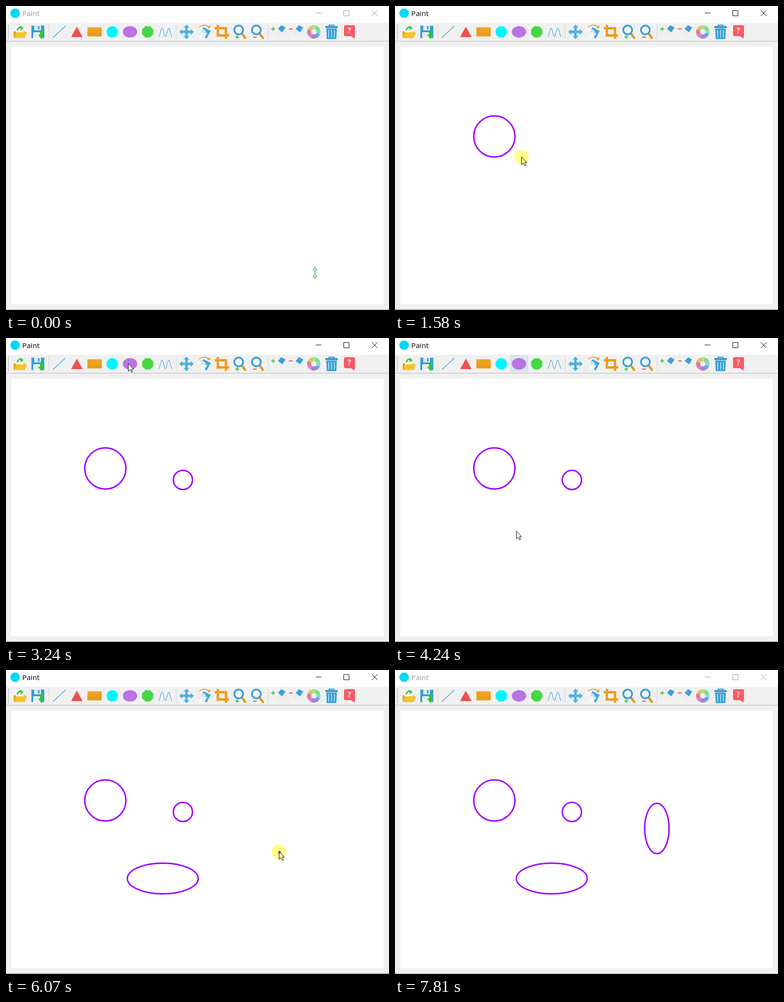
Write an HTML page with a canvas that moves like this. It is 800x635 px and loops after 7880 ms.

```html
<!DOCTYPE html>
<html lang="en">
<head>
<meta charset="utf-8">
<title>Paint</title>
<style>
html, body { margin: 0; width: 100%; height: 100%; overflow: hidden; background: #f0f0f0; }
canvas { display: block; }
</style>
</head>
<body>
<canvas id="stage" width="800" height="635"></canvas>
<script>
const ctx = document.getElementById('stage').getContext('2d');
const LOOP = 7880, STEP = 78, FOCUS = 710, BLUR = 7810, HIDE = 7248;
const BLUE = '#3ca7df', ORANGE = '#ee9f20', GREEN = '#35c935', RED = '#ef5350', PURPLE = '#a000ff';

// Drawing helpers
function fill(color) {
  ctx.fillStyle = color;
  ctx.fill();
}
function stroke(color, width) {
  ctx.strokeStyle = color;
  ctx.lineWidth = width;
  ctx.stroke();
}
function trace(points) {
  ctx.beginPath();
  for (let i = 0; i < points.length; i += 2) ctx.lineTo(points[i], points[i + 1]);
}
function poly(color, ...points) {
  trace(points);
  ctx.closePath();
  fill(color);
}
function line(color, width, ...points) {
  trace(points);
  stroke(color, width);
}
function rect(color, x, y, w, h) {
  ctx.fillStyle = color;
  ctx.fillRect(x, y, w, h);
}
function oval(color, x, y, rx, ry = rx) {
  ctx.beginPath();
  ctx.ellipse(x, y, rx, ry, 0, 0, 2 * Math.PI);
  fill(color);
}
function ring(color, width, x, y, rx, ry = rx) {
  ctx.beginPath();
  ctx.ellipse(x, y, rx, ry, 0, 0, 2 * Math.PI);
  stroke(color, width);
}
function arc(color, width, x, y, r, from, to) {
  ctx.beginPath();
  ctx.arc(x, y, r, from, to);
  stroke(color, width);
}
function turned(angle, draw) {
  ctx.save();
  ctx.rotate(angle);
  draw();
  ctx.restore();
}
function text(str, x, y, font, color) {
  ctx.font = font;
  ctx.fillStyle = color;
  ctx.fillText(str, x, y);
}
function sign(x, y, plus) {
  const color = plus ? GREEN : RED;
  rect(color, x - 4, y - 1, 8, 2);
  if (plus) rect(color, x - 1, y - 4, 2, 8);
}

// Toolbar icons, each drawn around its own centre
function openIcon() {
  rect('#e9a41e', -14, -1, 24, 13);
  turned(-.2, () => rect('#f8f8f8', -9, -6, 16, 10));
  poly('#f7c325', -8, 1, 14, 1, 9, 13, -13, 13);
  arc(GREEN, 3, 1, -3, 7, Math.PI, 4.9);
  poly(GREEN, 0, -13, 7, -8, 1, -3);
}
function saveIcon() {
  rect('#35a0d6', -14, -13, 27, 26);
  rect('#dfe8ec', -8, -13, 14, 10);
  rect('#35a0d6', 0, -12, 3, 7);
  rect('#ffffff', -10, 1, 18, 12);
  for (let y = 4; y < 12; y += 3) rect('#b9c4c9', -8, y, 12, 1);
  rect('#2fc436', 4, -3, 6, 10);
  poly('#2fc436', 0, 6, 14, 6, 7, 15);
}
function lineIcon() {
  line('#45a9de', 1.5, -13, 12, 13, -12);
}
function triangleIcon() {
  poly('#ec524e', 0, -11, 12, 11, -12, 11);
}
function rectIcon() {
  const shade = ctx.createLinearGradient(0, -10, 0, 10);
  shade.addColorStop(0, '#f3a522');
  shade.addColorStop(1, '#e6991a');
  rect(shade, -15, -9.5, 30, 19);
}
function circleIcon() {
  oval('#00f6ff', 0, 0, 12);
}
function ellipseIcon() {
  oval('#ba73e2', 0, 0, 15, 12);
}
function octagonIcon() {
  const corners = [];
  for (let a = Math.PI / 8; a < 2 * Math.PI; a += Math.PI / 4) {
    corners.push(12.7 * Math.cos(a), 12.7 * Math.sin(a));
  }
  poly('#46d745', ...corners);
}
function waveIcon() {
  const points = [];
  for (let x = -14; x <= 14; x++) points.push(x, 1 + 9 * Math.cos((x + 14) * Math.PI / 7));
  line('#58b3e2', 1.3, ...points);
}
function moveIcon() {
  for (let i = 0; i < 4; i++) {
    turned(i * Math.PI / 2, () => {
      rect('#46aee2', -2.5, -10, 5, 12);
      poly('#46aee2', -6, -9, 0, -15, 6, -9);
    });
  }
}
function rotateIcon() {
  turned(.48, () => rect(BLUE, -6, -8, 17, 18));
  oval('#f3f5f6', -4, 8, 6, 7);
  ctx.lineCap = 'round';
  for (let i = 0; i < 4; i++) line('#f3f5f6', 2.6, -7 + 3 * i, 7, -9 + 3.4 * i, -5 + (i - 1.5) ** 2);
  line('#f3f5f6', 2.8, 0, 10, 5, 3);
  ctx.lineCap = 'butt';
  arc(ORANGE, 1.8, 0, 1, 15, 3.9, 5.4);
  poly(ORANGE, 13, -14, 12, -7, 6, -9);
}
function cropIcon() {
  for (const angle of [0, Math.PI]) {
    turned(angle, () => line('#ee9c1c', 5, -8.5, -14.5, -8.5, 7.5, 15, 7.5));
  }
}
function magnifier(plus) {
  ctx.lineCap = 'round';
  line('#e5981d', 4.8, 6, 5, 11.5, 12.5);
  ctx.lineCap = 'butt';
  oval('#f4f8fa', -2, -4, 8);
  ring('#369fd7', 3.6, -2, -4, 9.2);
  sign(-5, 11, plus);
}
function pen(plus) {
  sign(-11, -6, plus);
  poly('#e4e4e4', 0, -2, 6, 3, -10, 13);
  line('#ffffff', 1.5, 3, 1, -9, 12);
  poly('#3b9fda', 6, -14, 15, -9, 8, 1, -1, -6);
}
function wheelIcon() {
  const slice = Math.PI / 4;
  for (let i = 0; i < 8; i++) {
    arc(`hsl(${175 + 45 * i} 60% 68%)`, 8.4, 0, 0, 9.8, (i - .5) * slice, (i + .53) * slice);
  }
}
function trashIcon() {
  ctx.strokeStyle = '#2f94cd';
  ctx.lineWidth = 2;
  ctx.strokeRect(-5, -14, 10, 4);
  rect('#2f94cd', -13, -12, 26, 4);
  poly('#36a0d8', -11, -7, 11, -7, 10, 15, -10, 15);
  for (let x = -7; x < 6; x += 6) rect('#a9d8f0', x, -4, 2, 16);
}
function helpIcon() {
  ctx.beginPath();
  ctx.roundRect(-11, -14, 23, 23, 3);
  fill('#f55c66');
  poly('#f55c66', 2, 8, 12, 6, 11, 14);
  ctx.textAlign = 'center';
  text('?', 0, 3, 'bold 16px "Open Sans", sans-serif', '#ffd5d5');
}

const FIRST_ICON = 30, PITCH = 37, GAP = 7;
const icons = [
  openIcon, saveIcon, null,
  lineIcon, triangleIcon, rectIcon, circleIcon, ellipseIcon, octagonIcon, waveIcon, null,
  moveIcon, rotateIcon, cropIcon, () => magnifier(true), () => magnifier(false), null,
  () => pen(true), () => pen(false), wheelIcon, trashIcon, helpIcon
];

// Pointer travel: each move starts where the one before it ended
const smooth = u => u * u * (3 - 2 * u);
const smoother = u => u * u * u * (u * (6 * u - 15) + 10);
const soft = u => (u + smooth(u)) / 2;
const start = { x: 645, y: 557 };
const moves = [
  { at: 70, steps: 7, x: 221, y: 55 },
  { at: 790, steps: 6, x: 164, y: 229 },
  { at: 1340, steps: 4, x: 264, y: 315, press: 1180, round: true },
  { at: 1660, steps: 8, x: 389, y: 316 },
  { at: 2370, steps: 3, x: 349, y: 273, press: 2215, round: true },
  { at: 2850, steps: 6, x: 255, y: 53, bend: .33 },
  { at: 3690, steps: 5, x: 376, y: 446, bend: -.1 },
  { at: 4084, steps: 3, x: 253, y: 403, bend: -.25 },
  { at: 4400, steps: 7, x: 401, y: 467, press: 4320 },
  { at: 5190, steps: 5, x: 489, y: 278, bend: .33 },
  { at: 5670, steps: 5, x: 572, y: 383 },
  { at: 6070, steps: 6, x: 521, y: 278, press: 5985, ease: smoother },
  { at: 6780, steps: 3, x: 640, y: 189 },
  { at: 7014, steps: 3, x: 760, y: 574 }
];
moves.forEach((move, i) => {
  move.from = moves[i - 1] || start;
  move.until = i + 1 < moves.length ? moves[i + 1].at : LOOP;
});
const drags = moves.filter(move => move.press);
const clicks = [FOCUS, 3470];
const hovers = [
  { icon: circleIcon, from: 538, to: drags[0].press },
  { icon: ellipseIcon, from: clicks[1], to: drags[2].press }
];

function along({ at, steps, from, x, y, bend = 0, ease = soft }, t) {
  const step = Math.floor((t - at) / STEP) + 1;
  const u = ease(Math.max(0, Math.min(1, step / steps)));
  const dx = x - from.x, dy = y - from.y, bow = 2 * u * (1 - u) * bend;
  return { x: Math.round(from.x + dx * u - dy * bow), y: Math.round(from.y + dy * u + dx * bow) };
}

function drawShape(drag, t) {
  if (t < drag.at) return;
  const { from, round } = drag, tip = along(drag, t);
  let w = tip.x - from.x, h = tip.y - from.y;
  if (round) {
    const side = Math.min(Math.abs(w), Math.abs(h));
    w = Math.sign(w) * side;
    h = Math.sign(h) * side;
  }
  ring(PURPLE, 3, from.x + .5 + w / 2, from.y + .5 + h / 2, Math.abs(w / 2), Math.abs(h / 2));
}

function drawTitleBar(ink) {
  rect('#ffffff', 0, 0, 800, 35);
  oval('#00d9f5', 19, 15, 10);
  text('Paint', 34, 21, '15.2px "Open Sans", "Noto Sans", sans-serif', ink);
  rect(ink, 647, 14, 12, 1);
  ctx.strokeStyle = ink;
  ctx.lineWidth = 1;
  ctx.strokeRect(705.5, 9.5, 11, 11);
  line(ink, 1, 764, 9, 776, 21);
  line(ink, 1, 776, 9, 764, 21);
}

function drawToolbar(t) {
  for (let y = 39; y < 70; y += 4) rect('#a8a8a8', 4, y, 2, 2);
  let x = FIRST_ICON;
  for (const icon of icons) {
    if (!icon) {
      rect('#d2d2d2', x - 15, 39, 1, 30);
      x += GAP;
      continue;
    }
    if (hovers.some(h => h.icon === icon && t >= h.from && t < h.to)) {
      rect('#c0dcf3', x - 18, 36, 37, 35);
      rect('#d8e6f2', x - 17, 37, 35, 33);
    }
    ctx.save();
    ctx.translate(x, 54);
    icon();
    ctx.restore();
    x += PITCH;
  }
}

function drawWindow(t) {
  const active = t >= FOCUS && t < BLUR;
  rect('#f0f0f0', 0, 0, 800, 635);
  rect('#b4b4b4', 0, 73, 800, 1);
  rect('#ffffff', 11, 85, 778, 538);
  rect(active ? '#707070' : '#aaaaaa', 0, 634, 800, 1);
  drawTitleBar(active ? '#000000' : '#999999');
  drawToolbar(t);
}

function resizeCursor() {
  for (const angle of [0, Math.PI]) {
    turned(angle, () => {
      trace([-1.5, 0, -1.5, -6.5, -4, -6.5, 0, -11.5, 4, -6.5, 1.5, -6.5, 1.5, 0]);
      fill('#ffffff');
      stroke('#18a33c', 1.1);
    });
  }
}
function arrowCursor() {
  poly('#ffffff', 0, 0, 0, 16, 4, 12.5, 6.5, 18, 9, 17, 6.5, 11.5, 11, 11.5);
  stroke('#000000', 1);
}

function drawPointer(t) {
  if (t >= HIDE) return;
  const { x, y } = along(moves.findLast(move => t >= move.at) || moves[0], t);
  ctx.save();
  ctx.translate(x + .5, y + .5);
  if (t < moves[0].at) resizeCursor();
  else arrowCursor();
  ctx.restore();
  const pressed = drags.some(drag => t >= drag.press && t < drag.until)
    || clicks.some(click => t >= click && t < click + STEP);
  if (pressed) {
    ctx.globalCompositeOperation = 'multiply';
    oval('#ffff8c', x, y, 15);
    ctx.globalCompositeOperation = 'source-over';
  }
}

const begin = performance.now();
function frame() {
  const t = (performance.now() - begin) % LOOP;
  drawWindow(t);
  for (const drag of drags) drawShape(drag, t);
  drawPointer(t);
  requestAnimationFrame(frame);
}
frame();
</script>
</body>
</html>
```
